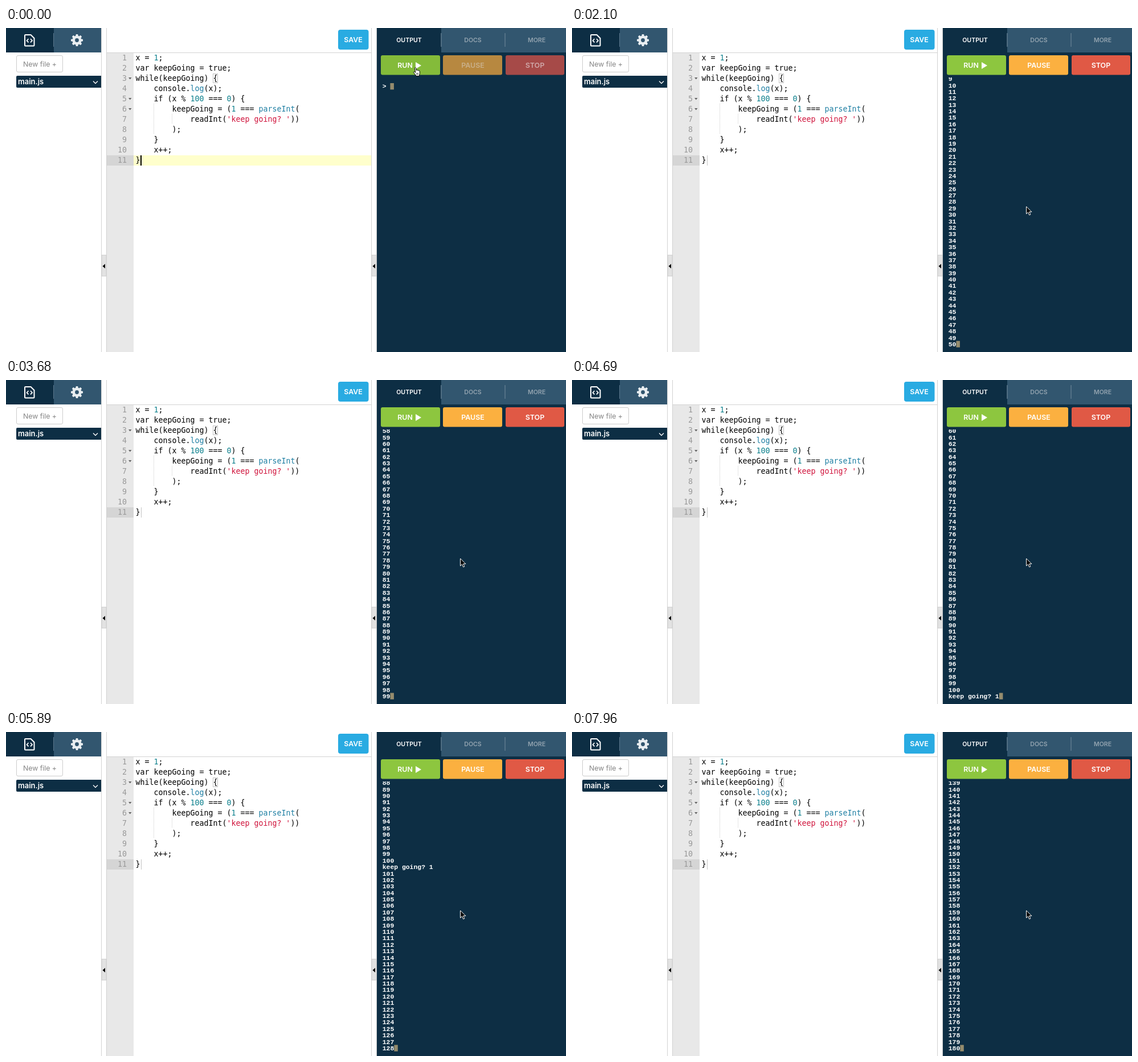
An HTML page that plays this animation: 983 by 570 pixels, repeating every 8 s.

```html
<!DOCTYPE html>
<html lang="en">
<head>
<meta charset="utf-8">
<title>Code runner</title>
<style>
  html, body { margin: 0; width: 100%; height: 100%; overflow: hidden; background: #fff; }
  svg { display: block; }
  text { font-family: Inter, "Open Sans", sans-serif; white-space: pre; }
  .code text { font: 13.29px "DejaVu Sans Mono", monospace; }
  .out text { font: bold 11.42px "Liberation Mono", monospace; fill: #fff; }
  .label { font-weight: 600; font-size: 12.4px; fill: #fff; text-anchor: middle; }
  .tab { font-weight: 600; font-size: 10.6px; text-anchor: middle; }
</style>
</head>
<body>
<svg id="stage" width="983" height="570" viewBox="0 0 983 570">
  <defs><clipPath id="outClip"><path d="M651 87h332v483h-332z"/></clipPath></defs>
  <rect width="983" height="570" fill="#fff"/>

  <!-- file panel -->
  <path d="M0 0h84v43H0z" fill="#0d2e44"/>
  <path d="M84 0h83v43H84z" fill="#32566f"/>
  <path d="M83.5 9v24" stroke="#59758a"/>
  <g fill="none" stroke="#fff" stroke-width="2">
    <path d="M34 12h9.500l6 6v12.500a1 1 0 0 1-1 1H34a1 1 0 0 1-1-1V13a1 1 0 0 1 1-1z"/>
    <path d="M39.500 19l-3 3.200 3 3.200M43 19l3 3.200-3 3.200" stroke-width="1.700"/>
  </g>
  <g id="gear" transform="translate(124.500 21.500)" fill="#e9eef1">
    <circle r="5.700" fill="none" stroke="#e9eef1" stroke-width="4.600"/>
  </g>
  <rect x="18.500" y="48.500" width="81" height="29" rx="2.500" fill="#fff" stroke="#ccc"/>
  <text x="30" y="68" font-size="12.300" fill="#858585">New file +</text>
  <path d="M167 84H20a2 2 0 0 0-2 2v17a2 2 0 0 0 2 2h147z" fill="#0d2e44"/>
  <text x="21" y="98.500" font-size="13" font-weight="600" fill="#fff">main.js</text>
  <path d="M153 93.500l4 4 4-4" fill="none" stroke="#fff" stroke-width="1.300"/>

  <!-- splitters -->
  <path d="M167.500 0v570M176.500 0v570M641.500 0v570M650.500 0v570M176 43.500h465" stroke="#d2d2d2"/>
  <path d="M168 399.500h8v37h-8zM642 399.500h8v37h-8z" fill="#e2e2e2" stroke="#d0d0d0"/>
  <path d="M174 415v8l-4.500-4zM648 415v8l-4.500-4z"/>
  <rect x="583" y="3" width="53.500" height="35" rx="4" fill="#29abe2"/>
  <text class="label" x="609.500" y="25">SAVE</text>

  <!-- editor -->
  <path d="M177 44h47v526h-47z" fill="#e8e8e8"/>
  <path d="M177 224h47v18h-47z" fill="#d5d5d5"/>
  <path id="active" d="M224 224h417v18H224z" fill="#ffffcc"/>
  <path d="M259.500 133v54M291.500 151v18" stroke="#ccc" stroke-dasharray="1 1"/>
  <rect x="363.500" y="80.500" width="8" height="16" fill="none" stroke="#c4c4c4"/>
  <path d="M237.500 224v18" stroke="#c4c4c4"/>
  <g class="code" id="code"></g>
  <path id="caret" d="M236 224h2v18h-2z"/>

  <!-- console panel -->
  <path d="M651 0h332v570H651z" fill="#0d2e44"/>
  <path d="M764 0h219v43H764z" fill="#32566f"/>
  <path d="M764 9v24M876 9v24" stroke="#5f7b8f" stroke-width="1.500"/>
  <text class="tab" x="707.500" y="24.500" fill="#fff">OUTPUT</text>
  <text class="tab" x="819.500" y="24.500" fill="#92a3af">DOCS</text>
  <text class="tab" x="931.500" y="24.500" fill="#92a3af">MORE</text>
  <rect id="run" x="658" y="48" width="104" height="34.500" rx="3"/>
  <text class="label" x="700.500" y="69.500">RUN</text>
  <path d="M719 60v12l10-6z" fill="#fff"/>
  <rect id="pause" x="767" y="48" width="104" height="34.500" rx="3"/>
  <text id="pauseText" class="label" x="819.500" y="70.300">PAUSE</text>
  <rect id="stop" x="877" y="48" width="103" height="34.500" rx="3"/>
  <text id="stopText" class="label" x="928.500" y="70.300">STOP</text>
  <g clip-path="url(#outClip)">
    <g class="out" id="out"></g>
    <rect id="block" width="6.500" height="11.300" fill="#958c6d"/>
  </g>
  <rect id="thumb" x="979" y="375" width="7" height="193" rx="3.500" fill="#000"/>

  <g id="hand" transform="translate(714 69)">
    <path d="M3.500 1.500c0-1.300 2-1.300 2.200 0l.7 4c.4-1 1.900-.9 2.100.2.500-.8 1.800-.5 2 .5.700-.6 1.800 0 1.800 1v3.600c0 1.500-1 2.500-1 4.700H5.800c-.4-2-3-4.200-4.300-6.200-.6-1.200.7-2 1.700-1.200l1.400 1.300z" fill="#fff" stroke="#000"/>
    <path d="M7 10v3.500M9 10v3.500" stroke="#000" stroke-width=".8"/>
  </g>
  <path id="arrow" d="M0 0v13l3-2.800 2.200 4.900 2.200-1-2.200-4.600h4.200z" fill="#000" stroke="#fff"/>
</svg>
<script>
const $ = id => document.getElementById(id);
const add = (parent, tag, attrs, html = '') => {
  const el = document.createElementNS('http://www.w3.org/2000/svg', tag);
  for (const k in attrs) el.setAttribute(k, attrs[k]);
  el.innerHTML = html;
  return parent.appendChild(el);
};
const show = (id, on) => $(id).style.display = on ? '' : 'none';
const fill = (id, color) => $(id).style.fill = color;

for (let a = 0; a < 360; a += 45)
  add($('gear'), 'path', { d: 'M-2.300-7L-1.700-10.500H1.700L2.300-7z', transform: `rotate(${a})` });

const source = `x = 1;
var keepGoing = true;
while(keepGoing) {
    console.log(x);
    if (x % 100 === 0) {
        keepGoing = (1 === parseInt(
            readInt('keep going? '))
        );
    }
    x++;
}`;
const paint = s => s.replace(/('.*?')|(\d+)|(log|parseInt)/g, (m, str, num) =>
  `<tspan fill="${str ? '#d0143c' : num ? '#0b7f8c' : '#1f7fa3'}">${m}</tspan>`);
source.split('\n').forEach((s, i) => {
  const y = 57 + 18 * i;
  add($('code'), 'text', { x: 212, y, fill: '#999', 'text-anchor': 'end' }, i + 1);
  add($('code'), 'text', { x: 227.500, y }, paint(s));
  if ([2, 4, 5].includes(i))
    add($('code'), 'path', { d: `M215 ${y - 6}h5.500l-2.750 3.500z`, fill: '#666' });
});

const ROWS = 41, PITCH = 11.385, LEFT = 660.7, CHAR = 6.86;
const rows = Array.from({ length: ROWS + 1 }, () => add($('out'), 'text', { x: LEFT }));

// [time, printed lines]; the count advances in ticks of about 60 ms
const keys = [[660, 1], [1440, 27], [2100, 50], [3140, 83], [3730, 101], [4930, 101], [4990, 102],
  [5890, 129], [6600, 143], [6960, 157], [7430, 170], [7490, 170], [7960, 181]];
const printed = t => {
  const i = keys.findIndex(k => k[0] > t);
  if (i === 0) return 0;
  if (i < 0) return keys[keys.length - 1][1];
  const [t0, n0] = keys[i - 1], [t1, n1] = keys[i];
  const ticks = Math.round((t1 - t0) / 60);
  return Math.round(n0 + (n1 - n0) * Math.floor((t - t0) / (t1 - t0) * ticks) / ticks);
};
const lineText = (i, t) =>
  i < 1 ? '' : i < 101 ? `${i}` : i > 101 ? `${i - 1}` : 'keep going? ' + (t >= 4690 ? '1' : '');

function drawOutput(t) {
  const n = printed(t), last = Math.max(n, 1);
  const scrolled = last >= ROWS;
  const top = scrolled ? 95.1 : 97;
  const first = scrolled ? last - ROWS : 0;
  rows.forEach((el, r) => {
    const i = first + r;
    el.setAttribute('y', top + (r - 1) * PITCH + 9.4);
    el.textContent = n ? (i <= n ? lineText(i, t) : '') : r === 1 ? '>' : '';
  });
  const width = n ? lineText(n, t).length : 2;
  $('block').setAttribute('x', LEFT + width * CHAR);
  $('block').setAttribute('y', top + (last - first - 1) * PITCH);
}

function drawMouse(t) {
  const p = Math.min(1, Math.max(0, (t - 780) / 660));
  const e = p * p * (3 - 2 * p);
  const x = 77 * e, y = 240 * e;
  const over = y < 8;
  show('hand', over);
  show('arrow', !over);
  $('hand').setAttribute('transform', `translate(${714 + x} ${69 + y})`);
  $('arrow').setAttribute('transform', `translate(${720.5 + x} ${74 + y})`);
  fill('run', !over ? '#8dc63f' : t >= 480 && t < 660 ? '#79ab34' : '#84bb3a');
}

function frame() {
  const t = performance.now() % 8000;
  const running = t >= 660;
  show('caret', t < 180);
  show('active', t < 480);
  fill('pause', running ? '#fbb040' : '#b78840');
  fill('stop', running ? '#e05945' : '#a64a48');
  fill('pauseText', running ? '#fff' : '#c9b08a');
  fill('stopText', running ? '#fff' : '#d0a9aa');
  const fade = t < 3730 ? 0 : t < 4330 ? 1 : t < 4390 ? 0.66 : t < 4450 ? 0.33 : 0;
  $('thumb').style.opacity = 0.5 * fade;
  drawOutput(t);
  drawMouse(t);
  requestAnimationFrame(frame);
}
frame();
</script>
</body>
</html>
```
